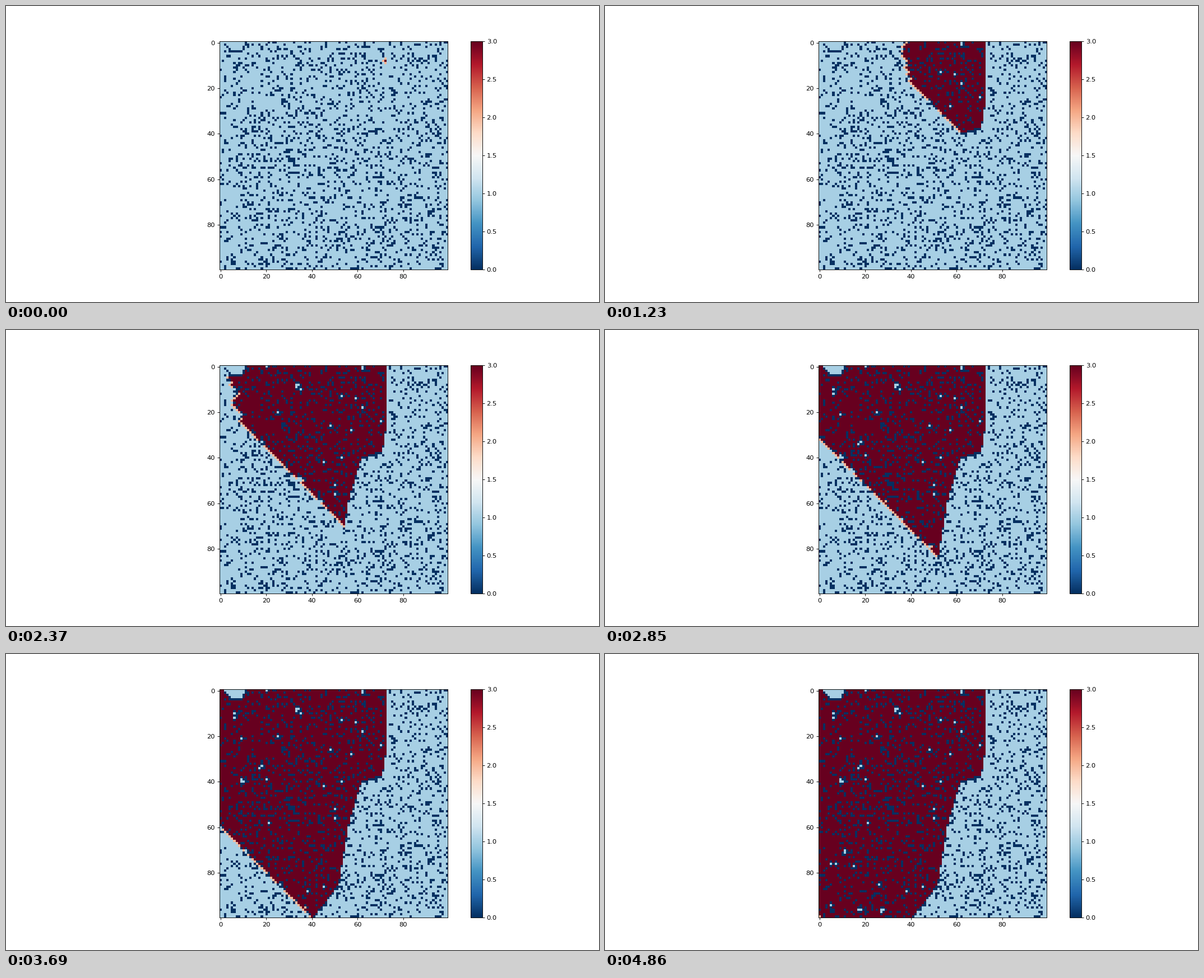
These frames come from a looping animation (1058 px wide and 529 px high, 4.89 s). A matplotlib script:

```python
import numpy as np
import matplotlib.pyplot as plt
from matplotlib.animation import FuncAnimation

SIZE = 100
FRAMES, INTERVAL = 163, 30
EMPTY, TREE, BURNING, BURNT = range(4)
START_COL, START_ROW = 72, 8
EMPTY_SHARE = 0.18
DPI = 1058 / 12.8


def spread(forest):
    """Step at which each tree catches fire; the wind stops it going east."""
    arrival = np.full(forest.shape, np.inf)
    front = np.zeros(forest.shape, bool)
    front[START_ROW, START_COL] = True
    step = 0
    while front.any():
        arrival[front] = step
        reach = np.zeros_like(front)
        reach[:, :-1] |= front[:, 1:]
        reach[:-1] |= front[1:]
        reach[1:] |= front[:-1]
        front = reach & (forest == TREE) & np.isinf(arrival)
        step += 1
    return arrival


def carve_east_edge(forest):
    """Let the fire descend along a broken line, with clear ground beyond it."""
    rows = [0, 26, 37, 40, 56, 85, 99]
    cols = [72, 72, 70, 61, 56, 51, 40]
    edge = np.interp(range(SIZE), rows, cols).round().astype(int)
    forest[range(SIZE), edge] = TREE
    for row, (col, below) in enumerate(zip(edge, edge[1:])):
        forest[row, below:col + 1] = TREE
        forest[row + 1, below + 1:col + 1] = EMPTY


def shelter_corner(forest):
    """Wall off a small wedge of trees on the north-western border."""
    for row in range(4):
        left, right = 2 + row, 11 - row // 2
        forest[row, left:right] = TREE
        forest[row, right] = EMPTY
        forest[row + 1, left:right] = EMPTY


def grow_forest():
    rng = np.random.default_rng(7)
    forest = np.where(rng.random((SIZE, SIZE)) < EMPTY_SHARE, EMPTY, TREE)
    carve_east_edge(forest)
    shelter_corner(forest)
    forest[START_ROW, START_COL - 1] = TREE
    return forest


forest = grow_forest()
arrival = spread(forest)


def state(n):
    grid = forest.copy()
    grid[arrival == n + 1] = BURNING
    grid[arrival <= n] = BURNT
    return grid


fig, ax = plt.subplots(figsize=(12.8, 6.4), dpi=DPI)
image = ax.imshow(state(0), cmap="RdBu_r", vmin=EMPTY, vmax=BURNT)
fig.colorbar(image, ax=ax)


def update(n):
    image.set_data(state(n))
    return [image]


anim = FuncAnimation(fig, update, frames=FRAMES, interval=INTERVAL,
                     repeat=True, repeat_delay=0)
plt.show()
```
